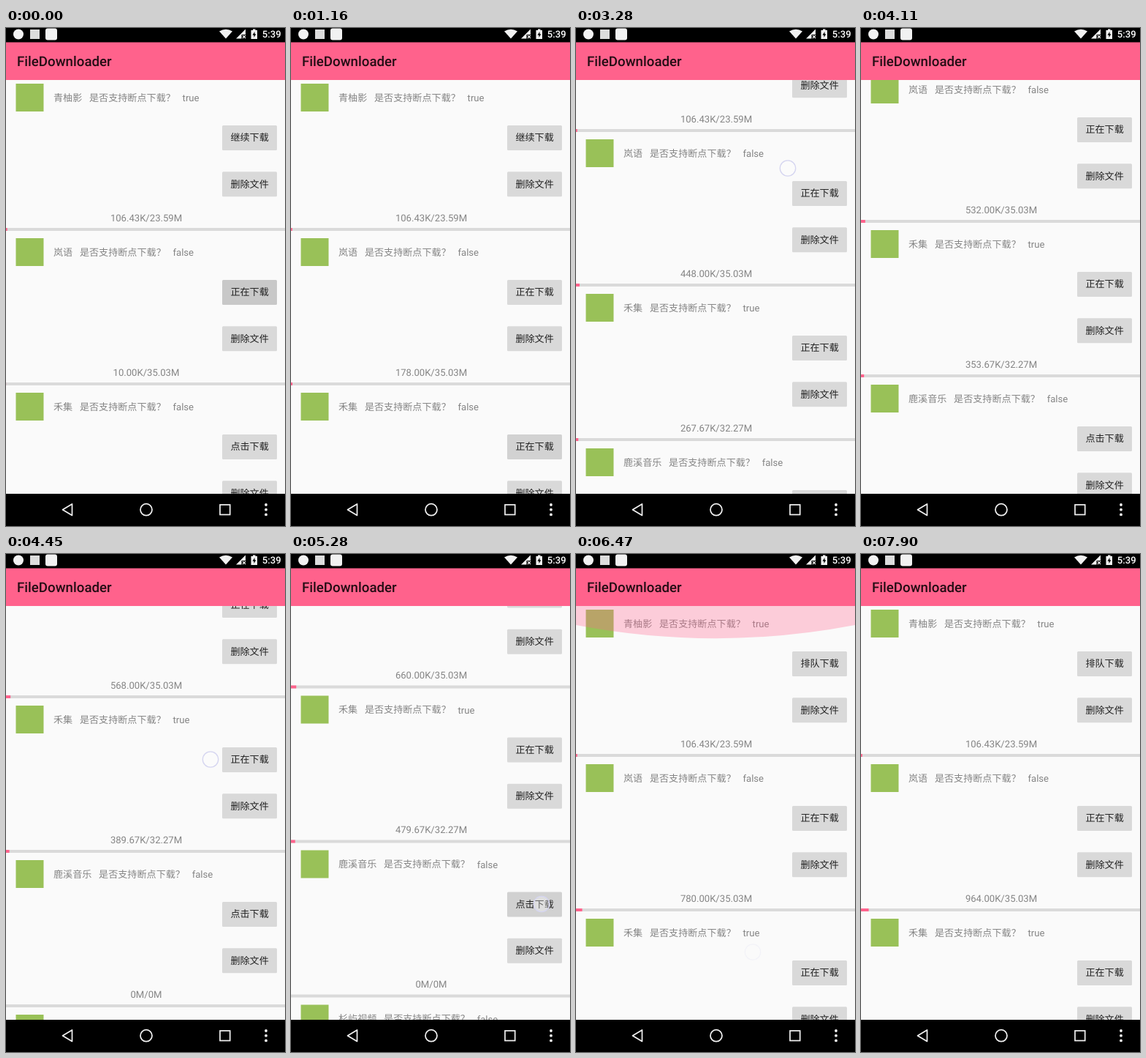
These frames come from a looping animation (382 px wide and 680 px high, 8 s). An HTML page:

```html
<!DOCTYPE html>
<html lang="zh-CN">
<head>
<meta charset="utf-8">
<title>FileDownloader</title>
<style>
  html, body { margin: 0; width: 100%; height: 100%; overflow: hidden; background: #000; }
  svg { display: block; width: 100%; height: 100%; }
  text {
    font: 13.1px Roboto, "Noto Sans CJK SC", "Noto Sans CJK", sans-serif;
    text-rendering: geometricPrecision;
  }
  .muted { fill: #858585; }
  .label { fill: #222; text-anchor: middle; }
  .count { fill: #858585; text-anchor: middle; }
  .title { font-size: 18.7px; font-weight: 500; fill: #240d14; }
  .clock { font-weight: 500; fill: #fff; }
</style>
</head>
<body>
<svg id="stage" viewBox="0 0 382 680">
  <defs><clipPath id="view"><rect y="71" width="382" height="565"/></clipPath></defs>
  <rect width="382" height="680"/>
  <rect y="71" width="382" height="565" fill="#fafafa"/>
  <g clip-path="url(#view)">
    <g id="list"></g>
    <path id="glow" d="M0 71V97A1022 1022 0 0 0 382 97V71Z" fill="#ff628c"/>
  </g>
  <circle id="touch" r="10.7" fill="#fff" fill-opacity=".3" stroke="#d5d5f0" stroke-width="1.3"/>

  <rect y="19.5" width="382" height="51.5" fill="#ff628c"/>
  <text class="title" x="15" y="52">FileDownloader</text>

  <g fill="#f2f2f2">
    <circle cx="17" cy="8.5" r="7"/>
    <rect x="33" y="2" width="13" height="13" fill="#dcdcdc"/>
    <rect x="54" y="0.5" width="16" height="16" rx="3"/>
    <path d="M301 14.5L292 4.6Q301 -1 310 4.6Z"/>
    <path d="M328 1.5V9H322.5V14.5H315Z"/>
    <path d="M324 10L328 14M328 10L324 14" stroke="#f2f2f2" stroke-width="1.2"/>
    <path d="M338 1.5H341.5V3H344V15H335.5V3H338Z"/>
    <path d="M340.5 5L337.5 9.7H339.5V13L342.3 8.3H340.5Z" fill="#000"/>
  </g>
  <text class="clock" x="350.8" y="13.2">5:39</text>

  <g fill="none" stroke="#f2f2f2" stroke-width="1.7">
    <path d="M90.5 650V665.5L77.5 657.7Z" stroke-linejoin="round"/>
    <circle cx="192" cy="657.7" r="8"/>
    <rect x="293" y="651" width="13.7" height="13.5"/>
  </g>
  <g fill="#f2f2f2">
    <circle cx="356" cy="651" r="1.9"/>
    <circle cx="356" cy="657.7" r="1.9"/>
    <circle cx="356" cy="664.4" r="1.9"/>
  </g>
</svg>
<script>
const NS = 'http://www.w3.org/2000/svg';
const LOOP = 8000, STEP = 118, LAST = 67;
const EM = 13.1, PITCH = 211, WIDTH = 382;
const $ = id => document.getElementById(id);

function add(parent, tag, attrs, text) {
  const el = document.createElementNS(NS, tag);
  for (const k in attrs) el.setAttribute(k, attrs[k]);
  if (text) el.textContent = text;
  return parent.appendChild(el);
}

// Linear interpolation through [step, value] points.
function along(points, n) {
  if (n <= points[0][0]) return points[0][1];
  for (let i = 1; i < points.length; i++) {
    const [a, u] = points[i - 1], [b, v] = points[i];
    if (n <= b) return u + (v - u) * (n - a) / (b - a);
  }
  return points[points.length - 1][1];
}

// Latest value whose step has been reached.
const held = (points, n) => points.filter(p => p[0] <= n).pop()[1];

const IDLE = '点击下载', BUSY = '正在下载', QUEUED = '排队下载', RESUME = '继续下载';
const none = [[0, 0]];
const even = (points, n) => 2 * Math.round(along(points, n) / 2);

const received = [[0, 10], [19, 330], [28, 448], [38, 568], [52, 750], [55, 780], [67, 964]];
const receivedLate = [[9, 30], [28, 268], [38, 390], [52, 570], [67, 780]];

const apps = [
  { name: '青柚影', total: 23.59, size: () => 106.43,
    state: [[0, RESUME], [15, QUEUED]], resumable: [[0, true]],
    press: [[13, 0], [15, 1], [17, .75], [19, .4], [22, 0]] },
  { name: '岚语', total: 35.03, size: n => even(received, n),
    state: [[0, BUSY]], resumable: [[0, false]],
    press: [[0, 1], [7, 0]] },
  { name: '禾集', total: 32.27, size: n => n < 9 ? 0 : even(receivedLate, n) - .33,
    state: [[0, IDLE], [8, BUSY]], resumable: [[0, false], [11, true]],
    press: [[6, 0], [8, .7], [13, 0]] },
  { name: '鹿溪音乐', total: 0, size: () => 0,
    state: [[0, IDLE], [46, QUEUED]], resumable: [[0, false]],
    press: [[44, 0], [46, 1], [50, 0]] },
  { name: '杉屿视频', total: 0, size: () => 0,
    state: [[0, IDLE]], resumable: [[0, false]], press: none }
];

function button(g, y, text) {
  const box = add(g, 'rect', { x: 296, y, width: 75, height: 34, rx: 1.5, fill: '#d9d9d9' });
  const label = add(g, 'text', { class: 'label', x: 333.6, y: y + 21.2 }, text);
  return { box, label };
}

function buildRow(app, i) {
  const g = add($('list'), 'g', { transform: `translate(0 ${i * PITCH})` });
  const ask = 65 + EM * app.name.length + 9.7;
  add(g, 'rect', { x: 13.5, y: 76, width: 38, height: 38, fill: '#99c158' });
  add(g, 'text', { class: 'muted', x: 65, y: 99.8 }, app.name);
  add(g, 'text', { class: 'muted', x: ask, y: 99.8 }, '是否支持断点下载？');
  const flag = add(g, 'text', { class: 'muted', x: ask + EM * 9 + 9.7, y: 100 });
  const main = button(g, 133, IDLE);
  button(g, 196.3, '删除文件');
  const count = add(g, 'text', { class: 'count', x: 192, y: 263.7 });
  add(g, 'rect', { y: 273, width: WIDTH, height: 4, fill: '#dadada' });
  const bar = add(g, 'rect', { y: 273, height: 4, fill: '#ff628c' });

  return n => {
    const size = app.size(n);
    const grey = Math.round(217 - 17 * along(app.press, n));
    flag.textContent = held(app.resumable, n);
    main.label.textContent = held(app.state, n);
    main.box.setAttribute('fill', `rgb(${grey},${grey},${grey})`);
    count.textContent = size ? `${size.toFixed(2)}K/${app.total.toFixed(2)}M` : '0M/0M';
    bar.setAttribute('width', size ? WIDTH * size / (app.total * 1000) : 0);
  };
}

const rows = apps.map(buildRow);

const scroll = [[22, 0], [24, 18], [26, 74], [28, 135], [30, 182], [32, 208], [35, 222],
  [36, 238], [38, 291], [39, 300], [41, 304.5], [49, 304.5], [50, 296], [52, 231.5],
  [53, 178], [54, 88], [55, 0]];
const pull = [[54, 0], [55, 1], [56, .9], [58, .5], [61, 0]];
const flick = [[50, 348], [52, 413], [54, 508], [55, 543.5]];

// Each contact: first step, last step, then x and y by step and scroll offset.
const contacts = [
  [6, 7, () => 346, () => 566],
  [13, 14, () => 343, () => 151],
  [23, 28, () => 290, (n, s) => 326.5 - s],
  [36, 39, () => 280, (n, s) => 571.5 - s],
  [44, 45, () => 343, () => 478],
  [50, 55, n => 217 + 5 * (n - 50), n => along(flick, n)]
];

function draw(time) {
  const n = Math.min(LAST, Math.floor((time + 36) / STEP));
  const s = along(scroll, n);
  rows.forEach(update => update(n));
  $('list').setAttribute('transform', `translate(0 ${-s})`);

  const p = along(pull, n);
  $('glow').setAttribute('transform', `translate(0 ${71 * (1 - p)}) scale(1 ${p})`);
  $('glow').setAttribute('opacity', .3 * p);

  const touch = contacts.find(([from, to]) => n >= from && n <= to);
  $('touch').setAttribute('opacity', touch ? along([[54, 1], [55, .2]], n) : 0);
  if (touch) {
    const [, , x, y] = touch;
    $('touch').setAttribute('transform', `translate(${x(n)} ${y(n, s)})`);
  }
}

const start = performance.now();
function tick() {
  draw((performance.now() - start) % LOOP);
  requestAnimationFrame(tick);
}
tick();
</script>
</body>
</html>
```
